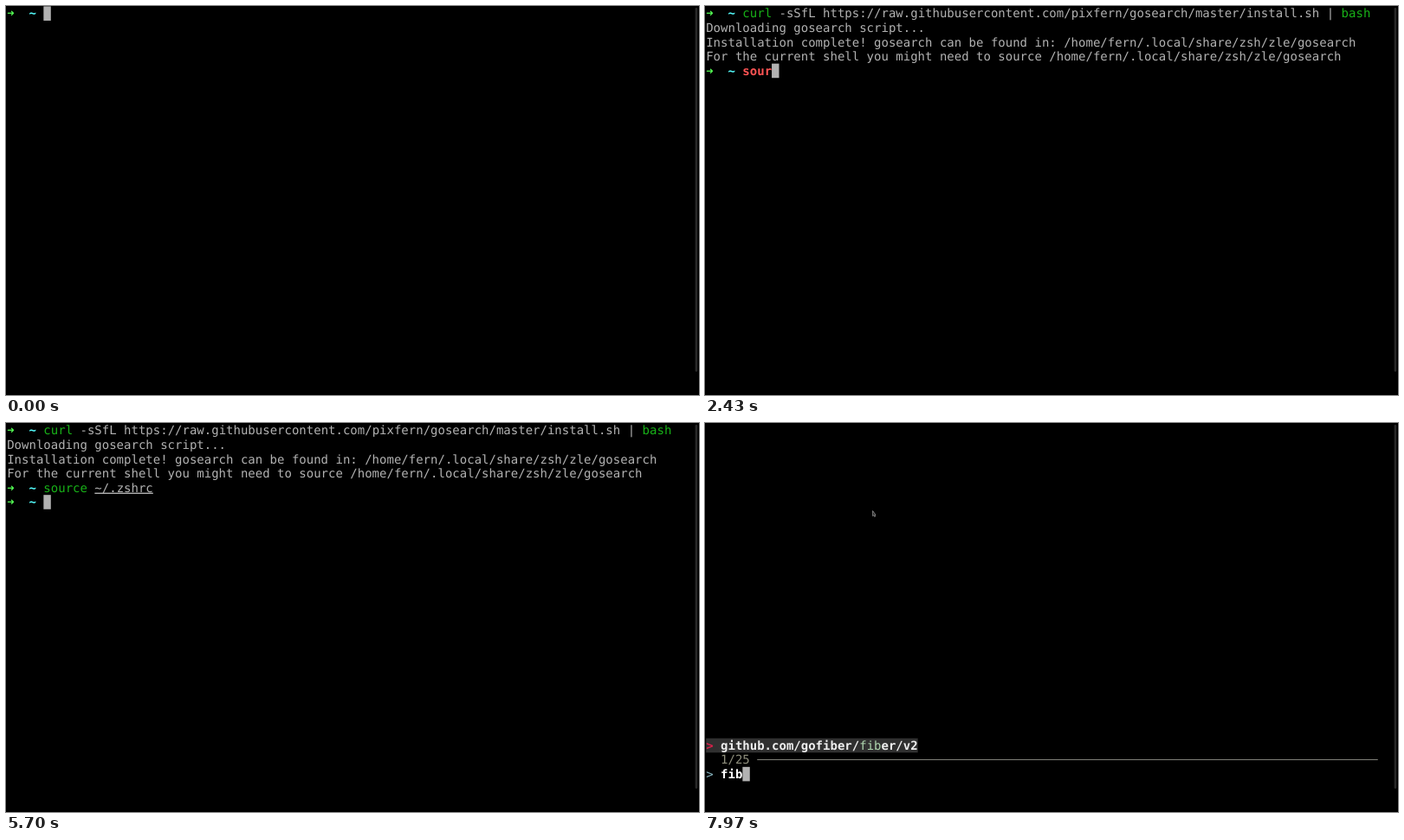
An HTML page that plays this animation: 800 by 450 pixels, repeating every 8 s.

```html
<!DOCTYPE html>
<html lang="en">
<head>
<meta charset="utf-8">
<title>Terminal session</title>
<style>
  html, body { margin: 0; width: 100%; height: 100%; overflow: hidden; background: #000; }
  svg { display: block; width: 800px; height: 450px; }
  text {
    font: 14px "DejaVu Sans Mono", monospace;
    text-rendering: geometricPrecision;
    white-space: pre;
    fill: #b2b2b2;
  }
  .bold, .arrow, .dir, .bad, .current, .pointer { font-weight: bold; }
  .arrow { fill: #54ff54; }
  .dir { fill: #54ffff; }
  .cmd { fill: #18b218; }
  .bad { fill: #ff5454; }
  .path { text-decoration: underline; }
  .bold { fill: #fff; }
  .current { fill: #eee; }
  .match { fill: #87af87; }
  .hit { fill: #afd7af; }
  .pointer { fill: #d7204a; }
  .prompt { fill: #87b5c0; }
  .info { fill: #8e8e7c; }
</style>
</head>
<body>
<svg viewBox="0 0 800 450">
  <rect width="800" height="450"/>
  <rect x="795.6" y="2" width="2.6" height="421" rx="1.3" fill="#292929"/>
  <g id="screen"></g>
</svg>
<script>
const PERIOD = 8000;
const CELL = 8.43, ROW = 16.56, LEFT = 1.2, TOP = 0.4, BASE = 13;
const LIST_ROWS = 23, LAST_COL = 92;

const TARGET = '/home/fern/.local/share/zsh/zle/gosearch';
const URL_TEXT = 'https://raw.githubusercontent.com/pixfern/gosearch/master/install.sh';
const GH = 'github.com/', NET = 'net/http', XNET = 'golang.org/x/net/http';

const packages = [
  NET,
  ...['httptest', 'httputil', 'pprof', 'httptrace', 'cookiejar', 'cgi', 'fcgi'].map(p => NET + '/' + p),
  ...['gofiber/fiber/v2', 'gorilla/mux', 'gin-gonic/gin', 'go-chi/chi/v5', 'labstack/echo/v4',
    'go-resty/resty/v2', 'prometheus/client_golang/prometheus/promhttp',
    'hashicorp/go-retryablehttp', 'hashicorp/go-cleanhttp', 'go-kit/kit/transport/http',
    'aws/smithy-go/transport/http', 'cloudevents/sdk-go/v2/protocol/http',
    'go-openapi/runtime'].map(p => GH + p),
  XNET + '2', XNET + '/httpproxy', XNET + '/httpguts',
  'google.golang.org/api/transport/http'
];

// Moments at which each character has been typed
const sourceKeys = [2130, 2230, 2310, 2400, 2530, 2620, 2780, 3400, 3560, 3850, 4100, 4200, 4290, 4370, 4450];
const goKeys = [5730, 5830, 5900, 5940, 5980, 6030, 6090, 6140, 6190, 6240, 6300];
const queryKeys = [7830, 7900, 7930];

const at = {
  paste: 430, enter: 900, download: 1200, installed: 1800,
  reload: 4620, ready: 5300, finder: 7530, results: 7570
};

// Mouse pointer: from, to, centre y
const beams = [[1400, 1700, 76.5], [4050, 4250, 89.5], [5130, 5500, 100.5]];

const colX = col => LEFT + col * CELL;
const rowY = row => TOP + row * ROW;
const typed = (text, keys, t) => text.slice(0, keys.filter(k => k <= t).length);

function text(row, col, str, cls = '') {
  return str ? `<text class="${cls}" x="${colX(col)}" y="${rowY(row) + BASE}">${str.replace(/>/g, '&gt;')}</text>` : '';
}

function block(row, col, cols, fill) {
  return `<rect x="${colX(col)}" y="${rowY(row)}" width="${cols * CELL}" height="${ROW}" fill="${fill}"/>`;
}

const cursor = (row, col) => block(row, col, 1, '#b2b2b2');
const shellPrompt = row => text(row, 0, '➜', 'arrow') + text(row, 3, '~', 'dir');

function commandLine(row, line, name, argClass) {
  const word = line.slice(0, name.length);
  const known = word === name || word === 'g';
  return shellPrompt(row)
    + text(row, 5, word, known ? 'cmd' : 'bad')
    + text(row, 6 + name.length, line.slice(name.length + 1), argClass);
}

function shell(t) {
  let out = shellPrompt(0);
  if (t < at.paste) return out + cursor(0, 5);

  out += text(0, 5, 'curl', 'cmd') + text(0, 10, `-sSfL ${URL_TEXT} |`) + text(0, 87, 'bash', 'cmd');
  if (t < at.enter) return out + cursor(0, 91);
  if (t < at.download) return out + cursor(1, 0);

  out += text(1, 0, 'Downloading gosearch script...');
  if (t < at.installed) return out + cursor(2, 0);

  out += text(2, 0, 'Installation complete! gosearch can be found in: ' + TARGET)
    + text(3, 0, 'For the current shell you might need to source ' + TARGET);
  const source = typed('source ~/.zshrc', sourceKeys, t);
  out += commandLine(4, source, 'source', 'path');
  if (t < at.reload) return out + cursor(4, 5 + source.length);
  if (t < at.ready) return out + cursor(5, 0);

  const get = typed('go get http', goKeys, t);
  return out + commandLine(5, get, 'go') + cursor(5, 5 + get.length);
}

// Positions of the query letters in a name, or null
function matchIn(name, query) {
  const whole = name.lastIndexOf('/' + query) + 1;
  if (whole) return [...query].map((_, i) => whole + i);
  const found = [];
  let from = name.lastIndexOf(query[0]);
  for (const ch of query) {
    const i = from < 0 ? -1 : name.indexOf(ch, from);
    if (i < 0) return null;
    found.push(i);
    from = i + 1;
  }
  return found;
}

function search(query) {
  if (!query) return packages.map(name => ({ name, marks: [] }));
  return packages
    .map(name => ({ name, marks: matchIn(name, query) }))
    .filter(p => p.marks)
    .sort((a, b) => b.name.includes('/' + query) - a.name.includes('/' + query) || a.name.length - b.name.length);
}

function listItem({ name, marks }, i) {
  const row = LIST_ROWS - 1 - i, current = i === 0;
  let out = block(row, 0, current ? name.length + 2 : 1, '#303030');
  if (current) out += text(row, 0, '>', 'pointer');
  const plain = [...name].map((c, k) => marks.includes(k) ? ' ' : c).join('');
  out += text(row, 2, plain, current ? 'current' : '');
  for (const k of marks) out += text(row, 2 + k, name[k], current ? 'hit' : 'match');
  return out;
}

function finder(t) {
  const loaded = t >= at.results;
  const query = typed('fib', queryKeys, t);
  const items = loaded ? search(query) : [];
  const count = `${items.length}/${loaded ? packages.length : 0}`;
  const lineX = colX(3 + count.length);
  let out = items.slice(0, LIST_ROWS).map(listItem).join('');
  if (items.length > LIST_ROWS) {
    const rows = Math.floor(LIST_ROWS * LIST_ROWS / items.length);
    out += `<rect x="${colX(LAST_COL) + 3.7}" y="${rowY(LIST_ROWS - rows)}" width="1" height="${rows * ROW}" fill="#5f5f5f"/>`;
  }
  out += text(23, 2, count, 'info')
    + `<rect x="${lineX}" y="389" width="${colX(LAST_COL) - lineX}" height="1" fill="#808078"/>`
    + text(24, 0, '>', 'prompt') + text(24, 2, query, 'bold')
    + cursor(24, 2 + query.length);
  return out + '<path d="M193.6 101.6v6l1.2-1 .9 1.8 1-.5-.8-1.7h1z" fill="#222" stroke="#aaa" stroke-width=".7"/>';
}

function beam(t) {
  const b = beams.find(([from, to]) => t >= from && t < to);
  return b ? `<path transform="translate(195 ${b[2]})" d="M-1.5-3h3M0-3v6M-1.5 3h3" fill="none" stroke="#ccc" stroke-width=".9"/>` : '';
}

const screenEl = document.getElementById('screen');
const start = performance.now();
let shown = '';

function draw() {
  const t = (performance.now() - start) % PERIOD;
  const next = t < at.finder ? shell(t) + beam(t) : finder(t);
  if (next !== shown) screenEl.innerHTML = shown = next;
  requestAnimationFrame(draw);
}
draw();
</script>
</body>
</html>
```
